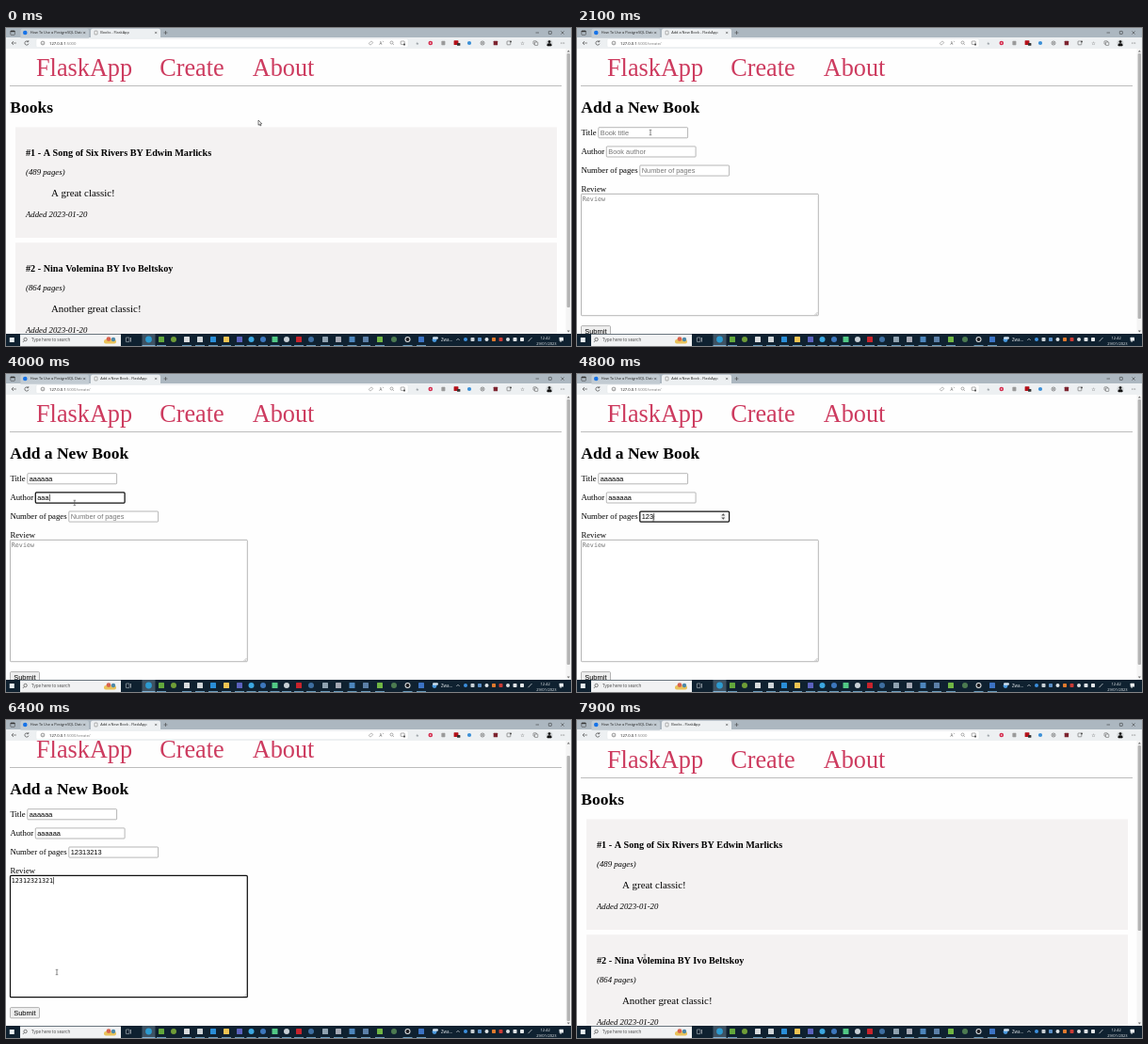
Animation of 600 by 338 pixels, one loop 8 s. Source, as an HTML page with a canvas:

```html
<!DOCTYPE html>
<html lang="en">
<head>
<meta charset="utf-8">
<title>Books - FlaskApp</title>
<style>
html, body { margin: 0; width: 100%; height: 100%; overflow: hidden; background: #fff; }
canvas { display: block; width: 600px; height: 338px; }
</style>
</head>
<body>
<canvas id="stage"></canvas>
<script>
const W = 600, H = 338, LOOP = 8000, STEP = 100;
const canvas = document.getElementById('stage');
const ctx = canvas.getContext('2d');
const dpr = Math.max(1, window.devicePixelRatio || 1);
canvas.width = W * dpr;
canvas.height = H * dpr;

const SERIF = '"Liberation Serif", "Times New Roman", serif';
const SANS = '"Liberation Sans", Arial, sans-serif';
const UI = '"Open Sans", "Noto Sans", sans-serif';
const MONO = '"DejaVu Sans Mono", monospace';
const PINK = '#cd3b5f';

// Cursor stops: time, x, y
const PATH = [
  [0, 268, 98], [200, 268, 98], [800, 206, 49], [1300, 205, 49],
  [2000, 78, 111], [2800, 78, 112], [3200, 70, 131], [3800, 70, 131],
  [4400, 81, 154], [4900, 81, 154], [5400, 76, 198], [5900, 76, 198],
  [6400, 54, 268], [6600, 54, 268], [7000, 22, 311], [7400, 22, 311],
  [7800, 72, 252], [8000, 72, 252]
];
const OPEN_FORM = 1000, SCROLL_AT = 6300, SUBMIT_AT = 7400;

const BOOKS = [
  ['#1 - A Song of Six Rivers BY Edwin Marlicks', '(489 pages)', 'A great classic!'],
  ['#2 - Nina Volemina BY Ivo Beltskoy', '(864 pages)', 'Another great classic!']
];

const FIELDS = [
  { id: 'title', label: 'Title', x: 22.8, y: 105.7, hint: 'Book title', value: 'aaaaaa', start: 2500, gap: 110 },
  { id: 'author', label: 'Author', x: 31.3, y: 125.9, hint: 'Book author', value: 'aaaaaa', start: 3700, gap: 110 },
  { id: 'pages', label: 'Number of pages', x: 66.8, y: 146, hint: 'Number of pages', value: '12313213', start: 4600, gap: 85 }
];
const REVIEW = { value: '12312321321', start: 5500, gap: 80 };

function rect(x, y, w, h, color) {
  ctx.fillStyle = color;
  ctx.fillRect(x, y, w, h);
}

function round(x, y, w, h, r, fill, stroke, line = 0.5) {
  ctx.beginPath();
  ctx.roundRect(x, y, w, h, r);
  if (fill) { ctx.fillStyle = fill; ctx.fill(); }
  if (stroke) { ctx.strokeStyle = stroke; ctx.lineWidth = line; ctx.stroke(); }
}

function dot(x, y, r, fill, stroke) {
  ctx.beginPath();
  ctx.arc(x, y, r, 0, Math.PI * 2);
  if (fill) { ctx.fillStyle = fill; ctx.fill(); }
  if (stroke) { ctx.strokeStyle = stroke; ctx.lineWidth = 0.6; ctx.stroke(); }
}

function line(color, width, ...pts) {
  ctx.beginPath();
  for (let i = 0; i < pts.length; i += 2) ctx.lineTo(pts[i], pts[i + 1]);
  ctx.strokeStyle = color;
  ctx.lineWidth = width;
  ctx.stroke();
}

function text(str, x, y, size, family, color = '#000', style = '') {
  ctx.font = `${style} ${size}px ${family}`;
  ctx.fillStyle = color;
  ctx.fillText(str, x, y);
  return ctx.measureText(str).width;
}

function typed(item, t) {
  const n = t < item.start ? 0 : 1 + Math.floor((t - item.start) / item.gap);
  return item.value.slice(0, n);
}

function focusAt(t) {
  if (t < 2200) return '';
  if (t < 3500) return 'title';
  if (t < 4400) return 'author';
  return t < 5400 ? 'pages' : 'review';
}

function cursorAt(t) {
  let i = 0;
  while (i < PATH.length - 2 && t >= PATH[i + 1][0]) i++;
  const [t0, x0, y0] = PATH[i], [t1, x1, y1] = PATH[i + 1];
  const p = Math.min(1, (t - t0) / (t1 - t0));
  const e = p * p * (3 - 2 * p);
  return [x0 + (x1 - x0) * e, y0 + (y1 - y0) * e];
}

function nav() {
  text('FlaskApp', 32, 50.7, 26.25, SERIF, PINK);
  text('Create', 163.2, 50.7, 26.25, SERIF, PINK);
  text('About', 261.7, 50.7, 26.25, SERIF, PINK);
  rect(4, 61, 586, 1, '#bdbdbd');
}

function booksPage() {
  nav();
  text('Books', 4.3, 90, 17.5, SERIF, '#000', 'bold');
  BOOKS.forEach(([title, pages, quote], i) => {
    const y = i * 122.7;
    rect(10, y + 105.5, 575, 117.5, '#f4f2f2');
    text(title, 21, y + 136, 10.2, SERIF, '#000', 'bold');
    text(pages, 21, y + 156.2, 8.75, SERIF, '#000', 'italic');
    text(quote, 48, y + 179, 10.9, SERIF, '#000');
    text('Added 2023-01-20', 21, y + 201, 8.75, SERIF, '#000', 'italic');
  });
}

function box(x, y, w, h, active) {
  if (active) round(x, y, w, h, 1, '#fff', '#101010', 1.25);
  else round(x, y, w, h, 0.8, '#fff', '#858585', 0.6);
}

function caret(x, y) {
  rect(x + 0.4, y, 0.6, 7.5, '#000');
}

function formPage(t) {
  const focus = focusAt(t);
  nav();
  text('Add a New Book', 4.3, 90, 17.5, SERIF, '#000', 'bold');
  for (const f of FIELDS) {
    const active = focus === f.id, value = typed(f, t);
    text(f.label, 4.4, f.y + 8.1, 8.75, SERIF);
    box(f.x, f.y, 94.8, 11.1, active);
    const w = text(value || f.hint, f.x + 1.9, f.y + 8.1, 7.4, SANS, value ? '#000' : '#757575');
    if (active) caret(f.x + 2 + (value ? w : 0), f.y + 1.8);
    if (active && f.id === 'pages') {
      round(f.x + 85.5, f.y + 1.4, 6, 8.3, 0, '#efefef');
      const cx = f.x + 88.5, cy = f.y + 5.5;
      for (const s of [-1, 1]) {
        ctx.beginPath();
        ctx.moveTo(cx - 1.9, cy + s);
        ctx.lineTo(cx + 1.9, cy + s);
        ctx.lineTo(cx, cy + s * 3.2);
        ctx.fillStyle = '#505050';
        ctx.fill();
      }
    }
  }
  text('Review', 4.4, 173.7, 8.75, SERIF);
  const active = focus === 'review', value = typed(REVIEW, t);
  box(4.5, 176.4, 251.8, 129.3, active);
  const w = text(value || 'Review', 5.8, 184.2, 6.7, MONO, value ? '#000' : '#757575');
  if (active) caret(5.4 + (value ? w : 0), 178);
  line('#8a8a8a', 0.5, 252.5, 305, 255.5, 302);
  line('#8a8a8a', 0.5, 254.2, 305, 255.5, 303.7);
  round(4.5, 316.6, 31, 11.2, 1, '#efefef', '#858585', 0.6);
  text('Submit', 8.2, 324.6, 7.5, SANS);
}

function scrollbar(top, bottom) {
  rect(594.5, 22, 5.5, 303, '#f4f4f4');
  round(595.6, top, 3.4, bottom - top, 1, '#b4b4b4');
  for (const [y, s] of [[24.6, -1], [322.6, 1]]) {
    ctx.beginPath();
    ctx.moveTo(595.8, y - s);
    ctx.lineTo(598.8, y - s);
    ctx.lineTo(597.3, y + s);
    ctx.fillStyle = '#707070';
    ctx.fill();
  }
}

function tab(x, w, label, fill, icon) {
  round(x, 0.8, w, 10, [2, 2, 0, 0], fill);
  icon();
  ctx.save();
  ctx.beginPath();
  ctx.rect(x, 0, w - 7.5, 11);
  ctx.clip();
  text(label, x + 10.2, 6.4, 3.9, UI, '#222');
  ctx.restore();
  cross(x + w - 4.8, 5, 1.1);
}

function cross(x, y, r) {
  line('#333', 0.5, x - r, y - r, x + r, y + r);
  line('#333', 0.5, x + r, y - r, x - r, y + r);
}

function page(x, y) {
  round(x - 1.4, y - 1.9, 2.8, 3.8, 0.3, '#fff', '#555', 0.5);
}

function browser(form, loading, tag) {
  rect(0, 0, W, 10.5, '#acb7c0');
  rect(0, 10, W, 12, '#edf0f2');
  round(4.8, 2.8, 4.6, 4.6, 0.8, null, '#333');
  rect(4.8, 3, 4.6, 1.2, '#333');
  tab(15.5, 72.5, 'How To Use a PostgreSQL Database', '#c2cbd2', () => dot(20.3, 5, 2.3, '#1673e8'));
  tab(90, 74, form ? 'Add a New Book - FlaskApp' : 'Books - FlaskApp', '#edf0f2', () => page(95.5, 5));
  line('#333', 0.5, 167.5, 5, 171.5, 5);
  line('#333', 0.5, 169.5, 3, 169.5, 7);
  line('#222', 0.5, 562.5, 5, 566, 5);
  round(576.3, 3.4, 3, 3, 0.4, null, '#222');
  cross(591, 5, 1.6);

  line('#444', 0.6, 11, 16, 6, 16);
  line('#444', 0.6, 8, 14, 6, 16, 8, 18);
  if (loading) cross(22, 16, 1.9);
  else {
    ctx.beginPath();
    ctx.arc(22, 16, 2.1, 0.3, 5.4);
    ctx.strokeStyle = '#333';
    ctx.lineWidth = 0.6;
    ctx.stroke();
    line('#333', 0.6, 23.8, 13, 23.8, 14.7, 22, 14.7);
  }
  round(32, 11.4, 395, 9.2, 1.6, '#fff', '#dfe3e6', 0.4);
  dot(39, 16, 1.9, null, '#555');
  line('#555', 0.5, 39, 15.7, 39, 17.2);
  const w = text('127.0.0.1', 46, 17.5, 4.2, UI, '#111');
  text(':5000' + (form ? '/create/' : ''), 46 + w, 17.5, 4.2, UI, '#777');

  if (tag) {
    ctx.save();
    ctx.translate(387.5, 16);
    ctx.rotate(-Math.PI / 4);
    round(-2, -1.3, 4, 2.6, 0.7, null, '#777');
    ctx.restore();
  }
  text('A', 396.4, 17.6, 4.4, UI, '#555');
  line('#555', 0.4, 400, 13.8, 401, 15);
  dot(409.5, 15.5, 1.5, null, '#777');
  line('#777', 0.5, 410.6, 16.6, 412, 18);
  round(419.2, 14, 4, 3.4, 0.5, null, '#555');
  dot(423, 17.6, 1.1, '#555');
  text('★', 434.8, 17.6, 4.6, '"DejaVu Sans", sans-serif', '#9aa0a6');
  dot(450.8, 16, 2.3, '#d42a4c');
  dot(450.8, 16, 0.8, '#fff');
  round(462.4, 13.8, 4, 4.4, 0.6, '#9a9a9a');
  round(475.6, 13.3, 4.8, 4.6, 0.5, '#b5121b');
  round(479, 16, 3.4, 2.8, 0.5, '#333');
  dot(492, 16, 2.1, '#3a8fd6');
  dot(506, 16, 2, null, '#555');
  dot(506, 16, 0.8, '#555');
  round(517.7, 13.8, 4.4, 4.4, 0.5, '#7d2430');
  round(532, 14, 3.8, 3.8, 0.5, null, '#444');
  dot(536, 14.4, 0.9, '#444');
  text('☆', 546.3, 17.8, 5, '"DejaVu Sans", sans-serif', '#333');
  round(560, 13.8, 3.4, 3.4, 0.5, null, '#444');
  round(561.4, 15, 3.4, 3.4, 0.5, '#edf0f2', '#444');
  dot(577, 16, 3.6, '#d5d8da');
  dot(577, 14.6, 1.4, '#111');
  round(574.4, 16.2, 5.2, 3, [2, 2, 1, 1], '#111');
  for (let i = 0; i < 3; i++) dot(589.4 + i * 1.7, 16, 0.45, '#333');
}

const APPS = [
  [165, '#62a83c', 1], [178, '#6f9d37', 0], [192, '#d9dcde', 1], [206, '#cfd5d8', 1],
  [220, '#2a8ed8', 1], [234, '#f0c452', 1], [248, '#5b62be', 1], [260.5, '#3ba7e0', 0],
  [273, '#3d77bd', 0], [285.5, '#52c985', 1], [298, '#c8d0d6', 0], [311, '#c8242c', 1],
  [324, '#3e6ea0', 0], [339, '#8fa2b0', 1], [353, '#a5a9b4', 1], [367.5, '#4d86bd', 1],
  [382, '#5c80a8', 1], [397, '#70b644', 1], [412, '#4c7a50', 0], [426.5, '#e3e5e6', 0],
  [441, '#3c73c4', 1]
];

function taskbar() {
  rect(0, 325, W, 13, '#0f2130');
  rect(3.8, 329, 5, 5, '#e8eef2');
  rect(15, 325.6, 107, 12.4, '#f1f2f3');
  dot(20.6, 331, 1.7, null, '#333');
  line('#333', 0.6, 19.4, 332.3, 17.9, 334);
  text('Type here to search', 27, 333.2, 4.5, UI, '#444');
  round(104, 331, 13, 4.6, 2, '#e9c35b');
  dot(109, 330.6, 2.4, '#d8624e');
  dot(114, 331, 2.2, '#4d89a9');
  round(127.4, 329, 3.6, 4.6, 0.3, null, '#dde3e7');
  line('#dde3e7', 0.6, 132.5, 329, 132.5, 333.6);
  rect(144.5, 325, 14, 13, '#3e5262');
  dot(151.5, 331, 3.4, '#2d9bd0');
  for (const [x, color, square] of APPS) {
    if (square) round(x - 3, 328, 6, 6, 0.6, color);
    else dot(x, 331, 3, color);
    if (x !== 178 && x !== 412) rect(x - 5, 337.2, 10, 0.8, '#7fb7dc');
  }
  dot(426.5, 331, 2, '#1b1b1f');
  rect(144.5, 337.2, 14, 0.8, '#8fcaf0');

  dot(455, 331.6, 2.4, '#4b9be0');
  round(453, 328.2, 6, 2.6, 1.3, '#cfe0ee');
  text('Zwa…', 462, 333, 4.5, UI, '#e8edf0');
  line('#e8edf0', 0.6, 478.3, 332, 480, 330.2, 481.7, 332);
  const tray = ['#3c8fdd', '#c9d0d5', '#5a8fc7', '#dfe4e7', '#e07a2d', '#cb3b35', '#d9dee1', '#e0e4e7', '#e4e8ea'];
  tray.forEach((color, i) => round(486 + i * 7.5, 329, 4, 4, i % 3 ? 0.8 : 2, color));
  line('#e4e8ea', 0.7, 554.5, 333.2, 558.5, 329);
  text('12:42', 567.5, 330.5, 4, UI, '#f2f5f7');
  text('29/01/2023', 563.3, 336.5, 4, UI, '#f2f5f7');
  round(587.6, 328.8, 4.4, 3.8, 0.4, '#edf1f3');
  rect(588.4, 332.2, 1.4, 1.4, '#edf1f3');
}

function pointer(kind, x, y) {
  if (kind === 'beam') {
    line('#555', 0.6, x - 1.3, y - 2.7, x + 1.3, y - 2.7);
    line('#555', 0.7, x, y - 2.7, x, y + 2.7);
    line('#555', 0.6, x - 1.3, y + 2.7, x + 1.3, y + 2.7);
    return;
  }
  ctx.save();
  ctx.translate(x, y);
  ctx.beginPath();
  const pts = kind === 'hand'
    ? [[-0.7, 0], [0.4, 0], [0.4, 2.3], [2.9, 3], [2.7, 5], [2, 6.6], [-1, 6.6], [-2.6, 4], [-2, 3.5], [-0.7, 4.5]]
    : [[0, 0], [0, 5.3], [1.2, 4.2], [2, 6], [2.9, 5.6], [2.1, 3.9], [3.7, 3.8]];
  for (const [px, py] of pts) ctx.lineTo(px, py);
  ctx.closePath();
  ctx.fillStyle = '#fff';
  ctx.fill();
  ctx.strokeStyle = '#222';
  ctx.lineWidth = 0.6;
  ctx.stroke();
  ctx.restore();
}

function pointerKind(t, x, y, form) {
  if (y < 57 && x > 162 && x < 232) return 'hand';
  if (!form) return t > 7700 ? 'beam' : 'arrow';
  const inField = FIELDS.some(f => x > f.x && x < f.x + 95 && y > f.y && y < f.y + 11.4);
  return inField || (y > 176 && y < 295 && x < 256) ? 'beam' : 'arrow';
}

function draw(t) {
  const form = t >= OPEN_FORM && t < SUBMIT_AT;
  const scroll = form && t >= SCROLL_AT ? 11 : 0;
  ctx.setTransform(dpr, 0, 0, dpr, 0, 0);
  rect(0, 0, W, H, '#fefefe');
  ctx.save();
  ctx.beginPath();
  ctx.rect(0, 22, 594.5, 303);
  ctx.clip();
  ctx.translate(0, -scroll);
  if (form) formPage(t);
  else booksPage();
  ctx.restore();

  // The list is longer once the new book is saved
  if (form) scrollbar(27 + scroll, 309 + scroll);
  else scrollbar(27, t < OPEN_FORM ? 297 : 224);
  const loading = (t >= 900 && t < OPEN_FORM) || (t >= 7300 && t < SUBMIT_AT);
  const tag = t < OPEN_FORM || (t >= 1500 && t < SCROLL_AT + STEP * 2);
  browser(form, loading, tag);
  taskbar();
  const [x, y] = cursorAt(t);
  pointer(pointerKind(t, x, y, form), x, y);
}

function frame(now) {
  draw(Math.floor((now % LOOP) / STEP) * STEP);
  requestAnimationFrame(frame);
}
draw(0);
requestAnimationFrame(frame);
</script>
</body>
</html>
```
